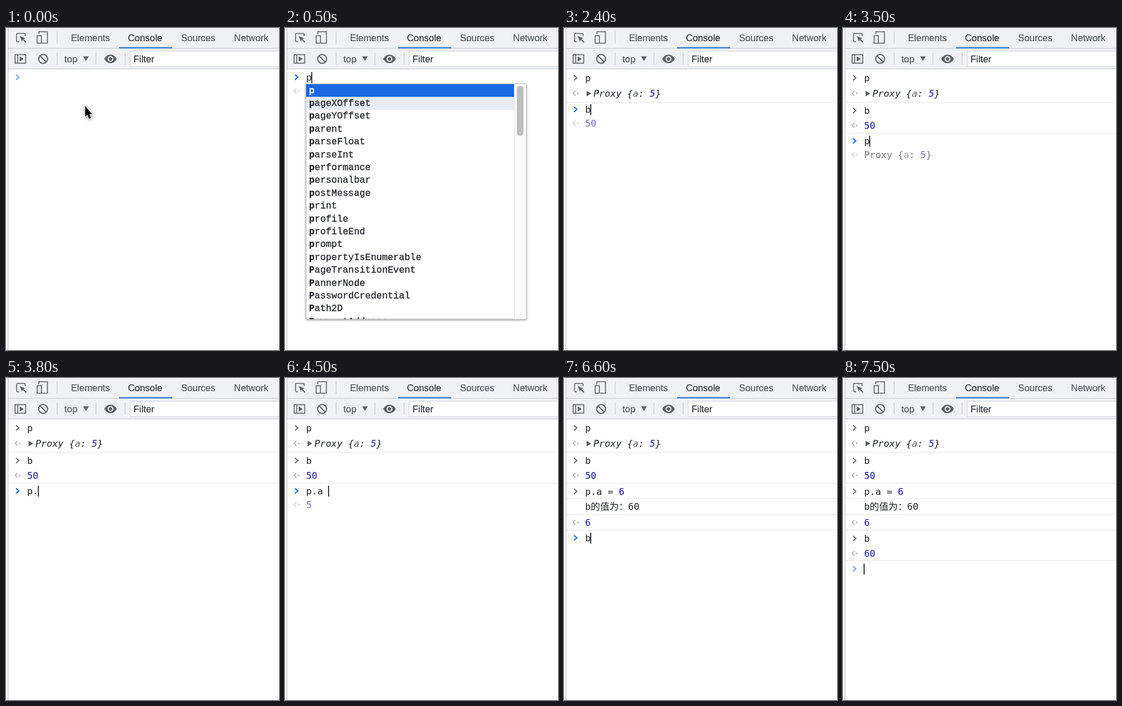
Recreate the animation shown at these times as an HTML page. Size 478 by 562 pixels, loop 8 s.

```html
<!DOCTYPE html>
<html lang="en">
<head>
<meta charset="utf-8">
<title>Console</title>
<style>
  html, body { margin: 0; width: 100%; height: 100%; overflow: hidden; background: #fff; }
  svg { display: block; width: 478px; height: 562px; }
  text { white-space: pre; }
  .ui { font: 16.4px "Liberation Sans", Arial, sans-serif; fill: #54585d; stroke: #54585d; stroke-width: .2; }
  .ui .dark { fill: #303337; stroke: #303337; }
  .code { font: 16.36px "DejaVu Sans Mono", "Noto Sans CJK SC", "Noto Sans CJK", monospace; fill: #202428; }
  .list { font: 16.4px "Liberation Mono", monospace; fill: #202428; stroke: #202428; stroke-width: .3; }
  .list .chosen { fill: #fff; stroke: #fff; }
  .list tspan { font-weight: bold; }
  .num { fill: #1a1aa6; }
  .lit { fill: #1c00cf; }
  .key { fill: #5c5f63; }
  .icon { fill: none; stroke: #5d6166; stroke-width: 1.6; }
  .solid { fill: #5d6166; }
  .shadow { filter: drop-shadow(0 1px 2px rgba(0, 0, 0, .45)); }
</style>
</head>
<body>
<svg viewBox="0 0 478 562">
  <rect width="478" height="562" fill="#fff"/>
  <rect x="4" width="474" height="71" fill="#eff1f4"/>
  <path d="M4 35.5H478M4 71.5H478" stroke="#c6cacf"/>
  <path d="M3.5 0V562" stroke="#b8bcc2"/>
  <path d="M89.5 6V27M89.5 43V64M157.5 43V64M208.5 43V64" stroke="#c3c7cc"/>
  <rect x="198" y="33.5" width="93" height="2" fill="#1a6fd6"/>
  <rect x="217.5" y="40.5" width="270" height="27" fill="#fff" stroke="#d0d3d8"/>

  <g class="icon">
    <path d="M23 24H20Q18.5 24 18.5 22.5V11Q18.5 9.5 20 9.5H32Q33.5 9.5 33.5 11V14"/>
    <path d="M28 18L35 25" stroke-width="2"/>
    <path d="M57.5 11V6.5H72.5V26.5H63"/>
    <rect x="54.5" y="13.5" width="7.5" height="13"/>
    <rect x="16" y="46.5" width="18.5" height="15"/>
    <path d="M20.5 46V62"/>
    <circle cx="65" cy="54" r="7.8" stroke-width="2"/>
    <path d="M59.5 48.5L70.5 59.5" stroke-width="2"/>
  </g>
  <g class="solid">
    <path d="M24 14L34 18 29.5 19.5 28 24ZM24 49.5L31 54 24 58.5ZM135 49.5H145L140 57.5Z"/>
    <path d="M172 54Q176 46.5 183 46.5T194 54Q190 61.5 183 61.5T172 54Z"/>
  </g>
  <circle cx="183" cy="54" r="5" fill="#eff1f4"/>
  <circle cx="183" cy="54" r="3.1" class="solid"/>

  <g class="ui">
    <text x="113.7" y="22.5">Elements</text>
    <text class="dark" x="213.5" y="22.5">Console</text>
    <text x="306.5" y="22.5">Sources</text>
    <text x="399.3" y="22.5">Network</text>
    <text x="102.3" y="59.5">top</text>
    <text class="dark" x="223.3" y="60">Filter</text>
  </g>
  <g id="view"></g>
</svg>
<script>
const LOOP = 8000, LEFT = 37, CHAR = 9.85, ROW = 22.4, LIST_HEIGHT = 410;
const view = document.getElementById('view');

const num = s => `<tspan class="num">${s}</tspan>`;
const lit = s => `<tspan class="lit">${s}</tspan>`;
const proxy = `Proxy {<tspan class="key">a</tspan>: ${num(5)}}`;

const lists = {
  p: {
    right: 422, thumb: 87,
    names: `p pageXOffset pageYOffset parent parseFloat parseInt performance personalbar
      postMessage print profile profileEnd prompt propertyIsEnumerable PageTransitionEvent
      PannerNode PasswordCredential Path2D PaymentAddress`.split(/\s+/)
  },
  b: {
    right: 392, thumb: 240,
    names: `b blur break btoa BackgroundFetchManager BackgroundFetchRecord
      BackgroundFetchRegistration BarcodeDetector BarProp BaseAudioContext BatteryManager
      BeforeInstallPromptEvent BeforeUnloadEvent BigInt BigInt64Array BigUint64Array
      BiquadFilterNode Blob BlobEvent`.split(/\s+/)
  }
};

const code = (x, y, s, style = '') => `<text class="code" x="${x}" y="${y}" style="${style}">${s}</text>`;
const chevron = (y, color) =>
  `<path d="M17.5 ${y - 4.5}l5 4.5-5 4.5" fill="none" stroke="${color}" stroke-width="2"/>`;
const back = (y, color) =>
  `<path d="M20 ${y - 4}l-4 4 4 4" fill="none" stroke="${color}" stroke-width="1.5"/>
   <circle cx="24" cy="${y}" r="1.3" fill="${color}"/>`;

const input = (y, s) => chevron(y, '#6b6f74') + code(LEFT, y + 6, s);
const output = (y, s) => back(y, '#a3a6aa') + code(LEFT, y + 6, s);

// Each entry: its content, its divider lines, and the prompt position after it.
const entries = [
  { html: input(87, 'p') + back(114, '#a3a6aa') + '<path d="M39.5 109.5L47.5 114.5 39.5 119.5Z" fill="#5b5e62"/>' +
      code(51.5, 120, proxy, 'font-style:italic'), lines: [129], next: 142 },
  { html: input(144, 'b') + output(170, num(50)), lines: [183], next: 197 },
  { html: input(198, 'p.a = ' + lit(6)) + code(LEFT, 230, 'b的值为：60') + output(252, num(6)),
    lines: [210, 238, 265], next: 279 },
  { html: input(280, 'b') + output(306, num(60)), lines: [318], next: 333 }
];

// time, entries shown, typed text, preview, popup, caret
const steps = [
  [0, 0, '', '', '', 0],
  [300, 0, 'p', '', '', 1],
  [400, 0, 'p', proxy, '', 1],
  [500, 0, 'p', proxy, 'p', 1],
  [900, 0, 'p', proxy, '', 1],
  [1300, 1, '', '', '', 1],
  [1900, 1, '', '', '', 0],
  [2000, 1, 'b', '', '', 1],
  [2100, 1, 'b', num(50), 'b', 1],
  [2400, 1, 'b', num(50), '', 1],
  [2600, 1, 'b', num(50), '', 0],
  [2800, 2, '', '', '', 1],
  [3400, 2, 'p', '', '', 1],
  [3500, 2, 'p', proxy, '', 1],
  [3600, 2, 'p', proxy, 'p', 1],
  [3800, 2, 'p.', '', '', 1],
  [3900, 2, 'p.a', '', '', 1],
  [4000, 2, 'p.a', num(5), '', 1],
  [4500, 2, 'p.a ', num(5), '', 1],
  [4600, 2, 'p.a =', '', '', 1],
  [4800, 2, 'p.a = ', '', '', 1],
  [5000, 2, 'p.a = 6', '', '', 1],
  [5300, 3, '', '', '', 1],
  [6400, 3, '', '', '', 0],
  [6600, 3, 'b', '', '', 1],
  [6700, 3, 'b', num(60), 'b', 1],
  [7000, 3, 'b', num(60), '', 1],
  [7200, 3, 'b', num(60), '', 0],
  [7500, 4, '', '', '', 1]
];

function popup(key, top, hover) {
  const { names, right, thumb } = lists[key], bar = right - 21, width = right - LEFT;
  const box = `x="${LEFT}" y="${top}" width="${width}" height="${LIST_HEIGHT}"`;
  const band = (i, color) =>
    `<rect x="${LEFT}" y="${top + i * ROW}" width="${bar - LEFT}" height="${ROW}" fill="${color}"/>`;
  const rows = names.map((name, i) =>
    `<text x="42" y="${top + 15.6 + i * ROW}" class="${i ? '' : 'chosen'}"><tspan>${name[0]}</tspan>${name.slice(1)}</text>`);
  return `
    <rect ${box} fill="#fff" stroke="#bdbdbd" class="shadow"/>
    <svg ${box} style="width:${width}px;height:${LIST_HEIGHT}px" viewBox="${LEFT} ${top} ${width} ${LIST_HEIGHT}">
      ${band(0, '#1a68e2')}
      ${hover ? band(1, '#e7ecf8') : ''}
      <g class="list">${rows.join('')}</g>
      <rect x="${bar}" y="${top}" width="21" height="${LIST_HEIGHT}" fill="#fafafa"/>
      <path d="M${bar + .5} ${top}v${LIST_HEIGHT}" stroke="#e4e4e4"/>
      <rect x="${bar + 5}" y="${top + 3}" width="11.5" height="${thumb}" rx="5.5" fill="#bdbdbd"/>
    </svg>`;
}

const pointer = `<path class="shadow" d="M138.500 136V155L142.500 151.500 145.500 158.500 149 157 146 150.500H151Z"
  stroke="#fff" stroke-width="2" paint-order="stroke"/>`;

function draw([time, count, typed, preview, list, caret]) {
  const shown = entries.slice(0, count);
  const y = count ? shown[count - 1].next : 86;
  const lines = shown.flatMap(e => e.lines);
  let html = lines.map(ly => `<rect x="4" y="${ly}" width="474" height="1" fill="#e9e9e9"/>`).join('');
  html += shown.map(e => e.html).join('');
  html += chevron(y, typed ? '#1a66e0' : '#78a3e6');
  html += code(LEFT, y + 6, typed.replace('6', lit(6)));
  if (preview) html += back(y + 24, '#c8cacc') + code(LEFT, y + 30, preview, 'opacity:.62');
  if (list) html += popup(list, y + 12, count === 0);
  if (caret) html += `<rect x="${LEFT - .8 + typed.length * CHAR}" y="${y - 9}" width="1.5" height="19"/>`;
  if (time === 0) html += pointer;
  view.innerHTML = html;
}

let current;
function tick() {
  const t = performance.now() % LOOP;
  const step = steps.findLast(s => s[0] <= t);
  if (step !== current) draw(current = step);
  requestAnimationFrame(tick);
}
tick();
</script>
</body>
</html>
```
